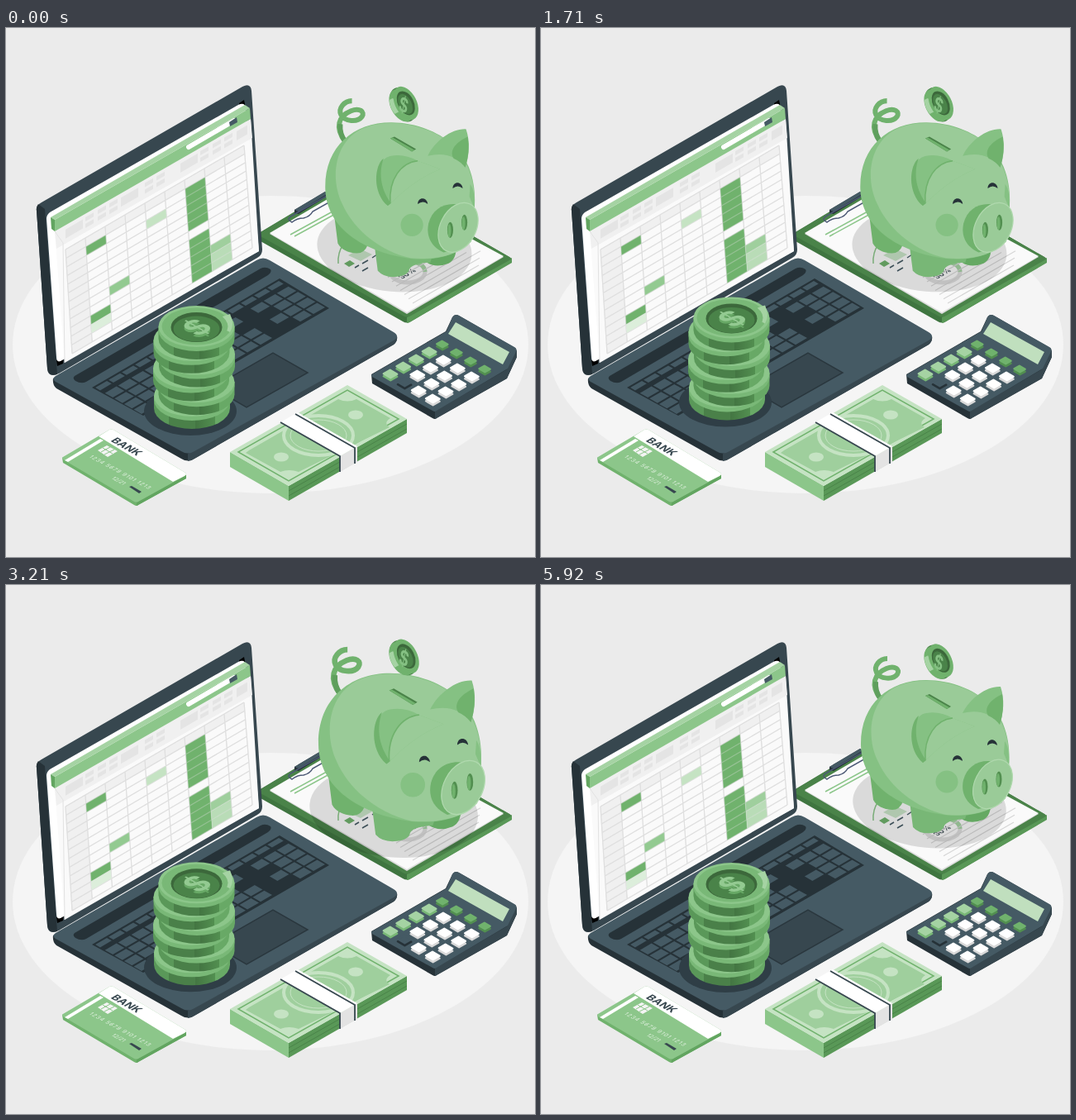
An HTML page that plays this animation: 640x640 px, repeating every 5.96 s.

```html
<!DOCTYPE html>
<html lang="en">
<head>
<meta charset="utf-8">
<title>Savings desk</title>
<style>
html, body { margin: 0; width: 100%; height: 100%; overflow: hidden; background: #ebebeb; }
svg { display: block; width: 100vw; height: 100vh; }
text { font-family: Inter, "Open Sans", sans-serif; }
</style>
</head>
<body>
<svg id="stage" viewBox="0 0 640 640">
  <defs>
    <linearGradient id="rim">
      <stop offset=".2" stop-color="#5a9859"/>
      <stop offset=".2" stop-color="#4a8049"/><stop offset=".54" stop-color="#4a8049"/>
      <stop offset=".54" stop-color="#437542"/><stop offset=".8" stop-color="#528f50"/>
      <stop offset=".8" stop-color="#68a966"/>
    </linearGradient>
  </defs>
  <ellipse cx="320" cy="383" rx="312" ry="180" fill="#f5f5f5"/>

  <g id="clipboard">
    <path d="M306 248L425 177Q430 174 435 177L609 277Q614 281 609 285L490 355Q485 358 480 355L308 258Q303 253 306 248Z" fill="#3f7540"/>
    <path d="M485 350L612 278V284L490 355Q487 357 485 357Z" fill="#599857"/>
    <path d="M307 248L425 177Q430 174 435 177L609 277Q613 279 609 281L490 348Q485 351 480 348L308 252Q305 250 307 248Z" fill="#4a8349"/>
    <path d="M319 249L430 184L602 277L485 346Z" fill="#dcdcdc"/>
    <path d="M319 248L430 183L602 276L485 344Z" fill="#fafafa"/>
    <path d="M349 220L386 198L391 202L354 225L349 224Z" fill="#263238"/>
    <path d="M349 220L386 198L390 200L354 222Z" fill="#455a64"/>
    <path d="M343 233Q340 230 346 227L388 203L396 208L371 222Q368 228 360 230Q352 230 346 235Z" fill="none" stroke="#4c5875" stroke-width="1.5"/>
    <path d="M344 250L397 221M349 252L402 223" stroke="#8cc68a" stroke-width="1.5"/>
    <path d="M402 285Q401 272 408 262" fill="none" stroke="#8cc68a" stroke-width="1.5"/>
    <path d="M409 285L416 281L422 285L415 289Z" fill="#70b26d"/>
    <path d="M414 275L428 267L443 274L429 282Z" fill="#c9e4c8"/>
    <path d="M422 290L427 287M431 285L438 281M443 278L449 274M431 294L438 290" stroke="#455a64" stroke-width="1.5"/>
    <ellipse cx="486" cy="295" rx="21" ry="13" fill="none" stroke="#dedede" stroke-width="5"/>
    <path d="M485 282Q506 283 507 295" fill="none" stroke="#a6d3a4" stroke-width="5"/>
    <text transform="matrix(.87 -.5 .87 .5 479 304)" font-size="9" font-weight="600" fill="#37474f">30%</text>
    <g id="notes" stroke="#d6d6d6" stroke-width="1.2"></g>
  </g>

  <g id="laptop">
    <path d="M57 424L310 281L473 373Q474 379 469 383L228 521Q220 526 212 521L61 436Q56 432 57 424Z" fill="#263238"/>
    <path d="M220 515L473 373Q474 379 469 383L228 521Q224 524 220 524Z" fill="#37474f"/>
    <path d="M60 421L303 281Q311 276 319 281L469 368Q477 373 469 378L228 512Q220 517 212 512L62 429Q54 425 60 421Z" fill="#455a64"/>
    <path d="M83 421L308 291Q314 288 320 292Q322 295 317 299L97 428Q91 431 84 427Q80 424 83 421Z" fill="#263238"/>
    <path d="M104 435L331 303L391 339L166 469Z" fill="#263238"/>
    <g id="keys" fill="#455a64"></g>
    <path d="M250 435L323 393L365 417L291 459Z" fill="#37474f" stroke="#2a373e" stroke-width="1.5"/>
    <path d="M37 221Q36 215 43 211L286 71Q296 66 297 76L310 268Q310 275 304 278L64 418Q51 424 50 412Z" fill="#37474f"/>
    <path d="M37 221Q36 217 39 213L47 219L62 419Q51 422 50 412Z" fill="#263238"/>
    <path d="M282 91L288 87L290 97L282 99ZM61 402L70 398L69 406L62 409Z" fill="#000"/>
    <path d="M49 231Q49 226 53 223L281 93Q289 89 290 97L306 270L66 403Q61 405 61 398Z" fill="#fff"/>
    <path d="M59 246L296 110L306 270L71 405Z" fill="#fafafa"/>
    <path d="M59 246L296 110L298 133L61 267Z" fill="#f0f0f0"/>
    <path d="M59 246L69 260L71 405" fill="none" stroke="#e2e2e2"/>
    <g id="tools" fill="#e4e4e4"></g>
    <path d="M59 232L295 97L296 110L59 246Z" fill="#8cc68a"/>
    <path d="M54 229L289 93L295 97L59 232Z" fill="#a5d3a3"/>
    <path d="M54 229L59 232V246L55 243Z" fill="#62a560"/>
    <path d="M221 144L276 112" stroke="#fff" stroke-width="6" stroke-linecap="round"/>
    <path d="M270 114L279 108L280 114L271 119Z" fill="#455a64"/>
    <g id="sheet"></g>
  </g>

  <g id="card">
    <path d="M68 520L127 487L218 541V545L160 577Q158 579 155 577L69 526Z" fill="#70b26d"/>
    <path d="M158 574L218 541V545L160 577Q159 578 158 578Z" fill="#62a560"/>
    <path d="M69 519L125 486Q127 485 130 486L217 538Q219 540 216 542L160 573Q158 574 155 573L69 522Q67 520 69 519Z" fill="#8cc68a"/>
    <path d="M112 494L125 486Q127 485 130 486L217 538Q219 540 216 542L202 549Z" fill="#fff"/>
    <path d="M71 523L114 497L118 499L75 525Z" fill="#fff"/>
    <text transform="matrix(.87 .5 -.87 .5 126 499.5)" font-size="12.8" font-weight="700" fill="#37474f">BANK</text>
    <path d="M111 511L122 505L135 512L123 519Z" fill="#f4f4f4"/>
    <path d="M115 513L126 507M119 516L131 510M117 508L129 515" stroke="#8cc68a" stroke-width="1"/>
    <g fill="#e4f2e3" font-size="7">
      <text transform="matrix(.87 .47 -.87 .5 100 519)" textLength="83">1234 5678 9101 1213</text>
      <text transform="matrix(.87 .47 -.87 .5 127 545)">12/21</text>
    </g>
    <path d="M149 555L152 554L164 561L161 563Z" fill="#37474f"/>
  </g>

  <g id="cash">
    <path d="M271 513L342 554V572L271 531Z" fill="#8cc68a"/>
    <path d="M342 554L485 473V490L342 572Z" fill="#599857"/>
    <path d="M342 560L485 479M342 566L485 485" stroke="#4a8349"/>
    <path d="M271 513L413 432L485 473L342 554Z" fill="#c5e3c3"/>
    <path d="M281 513L413 438L475 473L342 548Z" fill="none" stroke="#70b26d" stroke-width="1.5"/>
    <path d="M294 511L402 449Q413 454 424 449L465 472Q456 478 464 483L354 537Q342 533 332 537L290 514Z" fill="#9fcf9d"/>
    <ellipse cx="378" cy="493" rx="42" ry="24" fill="none" stroke="#c5e3c3" stroke-width="4"/>
    <ellipse cx="378" cy="493" rx="34" ry="19" fill="#9fcf9d" stroke="#c5e3c3"/>
    <ellipse cx="333" cy="519" rx="9" ry="5.5" fill="#c5e3c3"/>
    <ellipse cx="423" cy="468" rx="9" ry="5.5" fill="#c5e3c3"/>
    <path d="M404 518L425 506V525L404 537Z" fill="#e3e3e3"/>
    <path d="M332 477L353 465L425 506L404 518Z" fill="#fff"/>
    <path d="M332 477L404 518V537M350 467L422 508V527" fill="none" stroke="#37474f" stroke-width="1.8"/>
  </g>

  <g id="calc">
    <path d="M442 419L532 367L540 350Q543 345 548 348L616 387L618 391V398L606 424L521 472Q519 474 516 472L443 430Z" fill="#263238"/>
    <path d="M519 464L606 413L618 390V398L606 424L521 472Q520 473 519 473Z" fill="#37474f"/>
    <path d="M443 419L533 367L540 350Q543 345 548 348L615 386Q619 388 617 392L607 412L521 463Q519 465 516 463L443 422Q441 420 443 419Z" fill="#455a64"/>
    <path d="M544 356L609 392L601 407L535 370Z" fill="#c0dfbe"/>
    <g id="pad"></g>
  </g>

  <g id="stack"></g>

  <g id="pig">
    <ellipse cx="470" cy="267" rx="93" ry="51" fill="#000" opacity=".13" transform="rotate(5 470 267)"/>
    <path d="M509 268V283Q520 290 535 284Q545 279 544 262Z" fill="#65a963"/>
    <path d="M398 228L402 260Q408 271 425 272Q434 272 438 262L448 240Z" fill="#70b26d"/>
    <path d="M446 262L450 293Q458 302 474 300Q487 298 488 291Q492 284 513 283L518 268Z" fill="#78b776"/>
    <g fill="none" stroke="#70b26d" stroke-width="6">
      <path d="M411 138C398 121 403 107 418 101C428 97 435 102 431 108C426 115 410 114 406 106C402 98 410 89 419 89"/>
      <path d="M411 138Q404 129 405 117" stroke="#5f9f5d"/>
    </g>
    <path d="M387 194C386 145 420 115 466 115C505 115 546 135 559 168C567 188 567 205 566 220L562 258C545 275 520 280 496 279C440 274 388 245 387 194Z" fill="#85c183"/>
    <path d="M428 124C396 142 394 185 407 212C422 246 455 270 490 278C520 280 545 275 562 258L566 220C568 190 561 162 537 139C505 116 460 108 428 124Z" fill="#9acb98"/>
    <path d="M561 189Q567 197 566 218L560 204Z" fill="#85c183"/>
    <path d="M462 215C443 199 446 158 466 155Q482 152 498 161L525 171Q495 183 470 208Z" fill="#85c183"/>
    <path d="M462 215C443 199 446 166 457 158C450 178 455 197 466 212Z" fill="#70b26d"/>
    <path d="M465 212C463 183 478 163 498 161L525 171Q495 183 470 208Z" fill="#9acb98"/>
    <path d="M465 212C463 183 478 163 498 161" fill="none" stroke="#70b26d" stroke-width="1.5"/>
    <path d="M510 155C519 137 539 122 556 123C561 138 560 154 555 169Q539 148 510 155Z" fill="#85c183"/>
    <path d="M558 132C545 138 535 148 541 158Q550 162 555 169Q561 150 558 132Z" fill="#70b26d"/>
    <path d="M465 134L470 132L496 147L491 150Z" fill="#4a8349"/>
    <path d="M465 134L468 133L494 148L491 150Z" fill="#70b26d"/>
    <path id="eye" d="M498 213C498 204 509 204 510 213Q504 208 498 213Z" fill="#263238"/>
    <use href="#eye" transform="translate(42 -19)"/>
    <circle cx="491" cy="238" r="13.5" fill="#85c183"/>
    <path d="M529 271C512 263 508 249 511 236C515 220 528 212 543 213L553 218L538 269Z" fill="#70b26d"/>
    <ellipse cx="546.5" cy="241" rx="21.5" ry="31.5" transform="rotate(27 546.5 241)" fill="#9acb98" stroke="#b0d9ae" stroke-width="1.2"/>
    <g id="nostril"><ellipse cx="537" cy="244" rx="3.5" ry="9.5" fill="#528f50"/><ellipse cx="536" cy="245" rx="2" ry="8" fill="#70b26d"/></g>
    <use href="#nostril" transform="translate(17 -9)"/>
  </g>

  <g id="coin">
    <g transform="rotate(-27 481.5 92.5)">
      <ellipse cx="480" cy="92.5" rx="14" ry="22" fill="#4a8349"/>
      <ellipse cx="478" cy="92.5" rx="13" ry="21" fill="#70b26d"/>
      <path d="M468 80Q464 88 466 98L473 98V80Z" fill="#a5d3a3"/>
      <ellipse cx="484" cy="92.5" rx="13" ry="21.5" fill="#70b26d"/>
      <ellipse cx="484" cy="92.5" rx="9.5" ry="15.5" fill="#3c683b"/>
      <ellipse cx="483" cy="93" rx="7.5" ry="13" fill="#4a8349"/>
    </g>
    <text transform="matrix(.72 .38 -.2 1 474 99)" font-size="23" font-weight="700" fill="#85c183">$</text>
  </g>
</svg>
<script>
const LOOP = 5960;
const $ = id => document.getElementById(id);
const poly = (pts, fill, extra = "") =>
  `<polygon points="${pts.map(p => p.map(n => n.toFixed(1)).join()).join(" ")}"${fill ? ` fill="${fill}"` : ""} ${extra}/>`;
const range = n => [...Array(n).keys()];
// Maps grid units (u along a, v along b) to the stage
const plane = (o, a, b) => (u, v) => [o[0] + u * a[0] + v * b[0], o[1] + u * a[1] + v * b[1]];
const quad = (at, u0, v0, u1, v1) => [at(u0, v0), at(u1, v0), at(u1, v1), at(u0, v1)];

function drawSheet() {
  const at = (c, r) => {
    const u = c / 9, v = r / 12;
    return [72 + 216 * u + 8 * v + 2 * u * v, 268 - 126 * u + 126 * v - 2 * u * v];
  };
  const cell = (c, r, n, fill) => poly(quad(at, c, r, c + 1, r + n), fill);
  const line = (a, b) => `M${a}L${b}`;
  let d = "";
  for (let c = 0; c <= 9; c++) d += line(at(c, 0), at(c, 12));
  for (let r = 0; r <= 12; r++) d += line(at(0, r), at(9, r));
  const grid = alpha => `<path d="${d}" fill="none" stroke="#dedede" stroke-width="1.2" opacity="${alpha}"/>`;
  const marks = [[1, 1, 1, "#70b26d"], [1, 9, 1, "#70b26d"], [1, 10, 1, "#dceedb"], [2, 7, 1, "#93ca91"],
    [4, 2, 1, "#c5e3c3"], [6, 1, 5, "#70b26d"], [6, 7, 5, "#70b26d"], [7, 9, 1, "#9fcf9d"], [7, 10, 2, "#b9dcb7"]];
  $("sheet").innerHTML = poly(quad(at, 0, 0, 9, 1), "#f0f0f0") + cell(0, 0, 12, "#f0f0f0") +
    grid(1) + marks.map(m => cell(...m)).join("") + grid(.35);
}

function drawTools() {
  const bar = (x, dy, w, h) => {
    const y = 280 - x * .574 + dy;
    return poly([[x, y], [x + w, y - w * .574], [x + w, y - w * .574 + h], [x, y + h]]);
  };
  let out = "";
  for (const x of [72, 139, 211, 279]) out += bar(x, 5, x > 270 ? 13 : 21, 11);
  for (const x of [96, 111, 125, 168, 182, 235, 250, 264])
    out += bar(x, 4, 10, 5) + bar(x, 12, 10, 5);
  $("tools").innerHTML = out;
}

function drawKeys() {
  const at = plane([106, 435], [16, -9.3], [11.6, 6.6]);
  let out = "";
  for (let r = 0; r < 5; r++)
    for (let c = 0; c < 14; c++) {
      const gap = (c === 10 && r > 0) || (c === 11 && r > 1 && r !== 3) || (c === 9 && r === 2);
      const low = r ? .92 : .6;
      if (!gap) out += poly(quad(at, c + .06, r + .1, c + .93, r + low));
    }
  $("keys").innerHTML = out;
}

function drawPad() {
  const at = plane([465, 418.5], [15.7, -9], [17.1, 10]);
  let out = "";
  for (let b = 0; b < 4; b++)
    for (let a = 4; a >= 0; a--) {
      const [top, side] = a === 4 ? ["#70b26d", "#528f50"] : b === 0 ? ["#a5d3a3", "#78b776"]
        : a === 0 && b === 1 ? ["#455a64", "#263238"] : ["#fff", "#d9d9d9"];
      const k = a === 4 ? .2 : .25;
      const q = quad(at, a - k, b - k, a + k, b + k);
      const join = f => `stroke="${f}" stroke-width="2.4" stroke-linejoin="round"`;
      out += poly(q.map(([x, y]) => [x, y + 3]), side, join(side)) + poly(q, top, join(top));
    }
  $("pad").innerHTML = out;
}

function drawNotes() {
  $("notes").innerHTML = range(7).map(i => {
    const x = 492 - i * 5, y = 333 - i * 5.2, n = 80 + (i % 3) * 6;
    return `<path d="M${x} ${y}l${n} ${-n * .575}"/>`;
  }).join("");
}

function drawStack() {
  const xs = [225, 230.5, 224, 231, 224.5, 230.5], rx = 46, ry = 25;
  const disc = (x, y, h, fill) =>
    `<path d="M${x - rx} ${y}v${h}a${rx} ${ry} 0 0 0 ${2 * rx} 0v${-h}z" fill="${fill}"/>`;
  let out = `<ellipse cx="223" cy="463.5" rx="56" ry="29.5" fill="#2f3e46"/>`;
  xs.forEach((x, i) => {
    const y = 445 - i * 16.8;
    out += disc(x, y, 15, "url(#rim)") + disc(x, y, 5, "#79b877") +
      `<ellipse cx="${x}" cy="${y}" rx="${rx}" ry="${ry}" fill="#8cc68a"/>`;
  });
  out += `<ellipse cx="230.5" cy="361" rx="42" ry="22.5" fill="#79b877"/>
    <path d="M262 349l9-3q6 12 0 22l-8-4z" fill="#a5d3a3"/>
    <ellipse cx="230.5" cy="361" rx="38" ry="20.5" fill="#79b877"/>
    <ellipse cx="230.5" cy="362" rx="31" ry="18" fill="#3c683b"/>
    <ellipse cx="230.5" cy="364" rx="28" ry="15.5" fill="#4a8349"/>`;
  const sign = (y, fill) => `<text transform="matrix(.87 -.5 .87 .5 231 ${y})" y="12.5"
    text-anchor="middle" font-size="35" font-weight="700" fill="${fill}">$</text>`;
  $("stack").innerHTML = out + sign(365, "#68a966") + sign(362, "#93ca91");
}

// [time, scale, eased]
const BEATS = [[0, 1.008], [640, 1.18, 1], [1210, 1.087], [1760, 1], [2470, 1], [2760, 1.18, 1],
  [3210, 1.098], [3740, 1], [LOOP, 1]];

function beat(t) {
  const i = BEATS.findIndex(b => b[0] > t);
  const [t0, s0] = BEATS[i - 1], [t1, s1, eased] = BEATS[i];
  const k = (t - t0) / (t1 - t0);
  return s0 + (s1 - s0) * (eased ? (1 - Math.cos(Math.PI * k)) / 2 : k);
}

const zoom = (s, x, y) => `translate(${x} ${y}) scale(${s}) translate(${-x} ${-y})`;

function draw() {
  const t = performance.now() % LOOP;
  const s = beat(t), grow = s - 1;
  const lift = -5.6 * (1 - Math.cos(4 * Math.PI * t / LOOP));
  $("pig").setAttribute("transform", zoom(s, 479, 200));
  $("coin").setAttribute("transform", `translate(${4 * grow} ${-52 * grow}) ` + zoom(1 + .3 * grow, 481.5, 92.5));
  $("stack").setAttribute("transform", `translate(0 ${lift})`);
  requestAnimationFrame(draw);
}

drawSheet();
drawTools();
drawKeys();
drawPad();
drawNotes();
drawStack();
draw();
</script>
</body>
</html>
```
